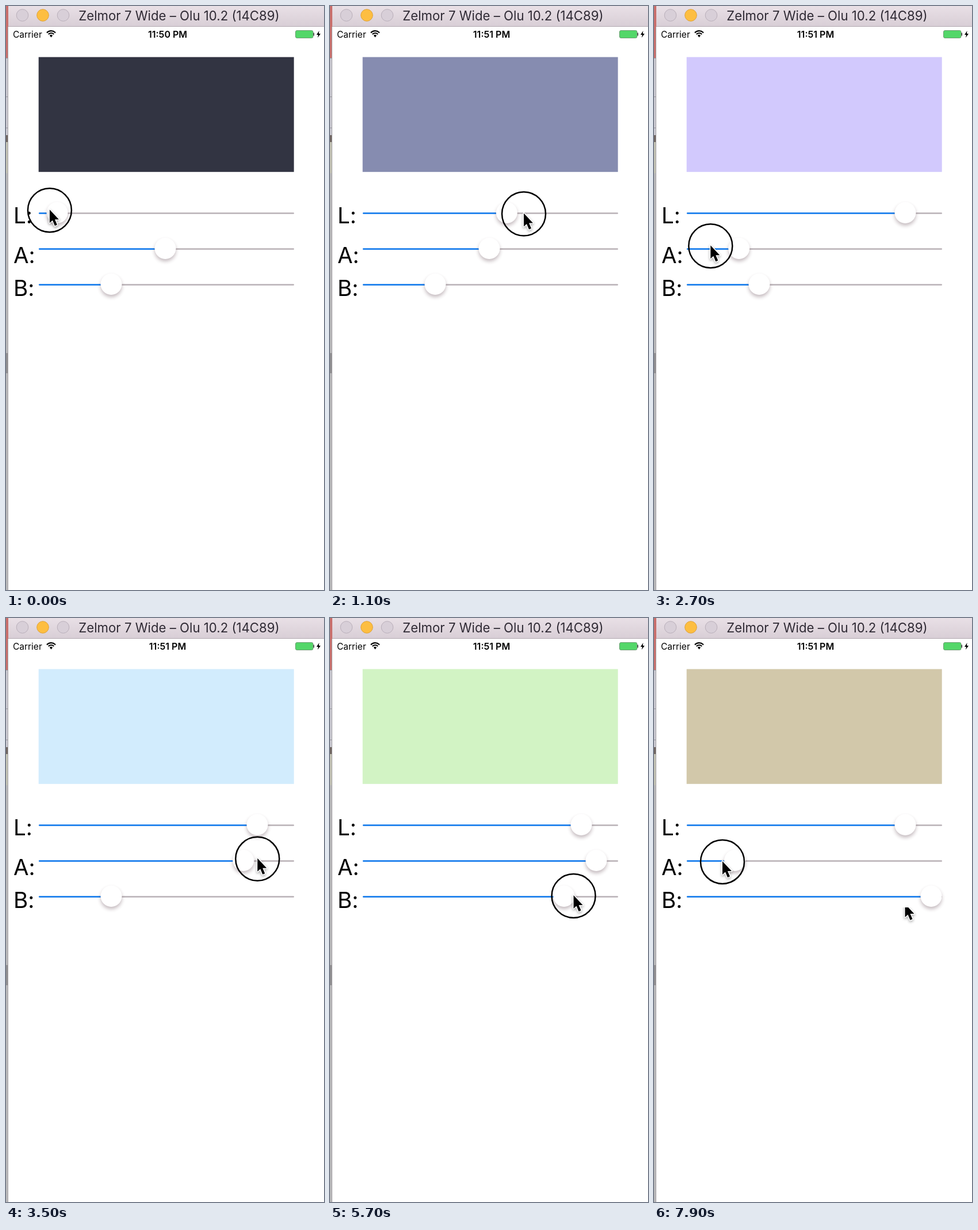
Animation of 553x1013 px, one loop 8000 ms. Source, as an HTML page with a canvas:

```html
<!DOCTYPE html>
<html lang="en">
<head>
<meta charset="utf-8">
<title>Colour sliders</title>
<style>
html, body { margin: 0; width: 100%; height: 100%; overflow: hidden; background: #fff; }
canvas { display: block; }
</style>
</head>
<body>
<canvas id="stage" width="553" height="1013"></canvas>
<script>
const ctx = document.getElementById('stage').getContext('2d');
const LOOP = 8000, STEP = 100, LAG = 60;
const FONT = 'Inter, Roboto, sans-serif';
const LEFT = 57, RIGHT = 501, RADIUS = 18.5;

// Turning points of the pointer: time, x, y
const turns = [
  [-520, 190, 356], [150, 60, 354], [780, 236, 352], [1420, 437, 369], [1700, 437, 369],
  [2100, 277, 420], [2340, 440, 420], [2760, 80, 416], [3650, 463, 418], [3900, 463, 418],
  [4200, 183, 478], [4350, 183, 478], [4840, 55, 481], [5810, 435, 482], [6400, 482, 484],
  [6700, 436, 497], [7000, 463, 422], [8150, 75, 423]
];

// Each slider follows the pointer during its drags
const sliders = [
  { name: 'L', y: 359.5, baseline: 377, drags: [[-520, 1700]] },
  { name: 'A', y: 421.5, baseline: 446, drags: [[2100, 3700], [7000, LOOP]] },
  { name: 'B', y: 483.5, baseline: 503, drags: [[4200, 6400]] }
];

const clamp = (v, lo, hi) => Math.min(hi, Math.max(lo, v));
const ease = u => (1 - Math.cos(Math.PI * u)) / 2;

function pointerAt(t) {
  const i = turns.findIndex(p => p[0] > t);
  const [t0, x0, y0] = turns[i - 1], [t1, x1, y1] = turns[i];
  const k = ease((t - t0) / (t1 - t0));
  return { x: x0 + (x1 - x0) * k, y: y0 + (y1 - y0) * k };
}

function knobAt({ drags }, t) {
  const late = t - LAG;
  const [from, to] = drags.findLast(d => d[0] <= late) || drags[0];
  return clamp(pointerAt(clamp(late, from, to)).x, LEFT + RADIUS, RIGHT - RADIUS);
}

function swatchColor(knobs) {
  const [l, a, b] = knobs.map(x => (x - LEFT - RADIUS) / (RIGHT - LEFT - 2 * RADIUS));
  const red = 236 * Math.max(0.212, l);
  const green = red * (0.916 + 0.253 * a);
  const blue = Math.min(253, red * (1.49 - 0.68 * b));
  return `rgb(${[red, green, blue].map(Math.round)})`;
}

function box(x, y, w, h, color) {
  ctx.fillStyle = color;
  ctx.fillRect(x, y, w, h);
}

function disc(x, y, r, fill, stroke, width = 1) {
  ctx.beginPath();
  ctx.arc(x, y, r, 0, Math.PI * 2);
  if (fill) { ctx.fillStyle = fill; ctx.fill(); }
  if (stroke) { ctx.strokeStyle = stroke; ctx.lineWidth = width; ctx.stroke(); }
}

function line(x0, x1, y, color) {
  ctx.beginPath();
  ctx.roundRect(x0, y - 1.3, x1 - x0, 2.6, 1.3);
  ctx.fillStyle = color;
  ctx.fill();
}

function poly(points, x, y) {
  ctx.beginPath();
  points.forEach(([px, py]) => ctx.lineTo(x + px, y + py));
  ctx.closePath();
}

function label(text, x, y, size, color = '#000', weight = 400, align = 'left') {
  ctx.font = `${weight} ${size}px ${FONT}`;
  ctx.textAlign = align;
  ctx.fillStyle = color;
  ctx.fillText(text, x, y);
  return x + ctx.measureText(text).width;
}

function desktopEdge() {
  box(0, 0, 4, 1013, '#b9b8ba');
  box(0, 0, 4, 90, '#c96f6c');
  box(0, 90, 4, 134, '#c9c8d0');
  for (const y of [90, 157, 211]) box(0, y, 4, 1, '#98969c');
  box(0, 224, 4, 12, '#6f6560');
  box(0, 236, 4, 54, '#c3c2b4');
  box(0, 602, 4, 35, '#8f8e90');
  box(3, 36, 1, 977, '#a9a7aa');
}

function titleBar() {
  const g = ctx.createLinearGradient(0, 0, 0, 35);
  g.addColorStop(0, '#e9e0e6');
  g.addColorStop(1, '#d8ced6');
  box(4, 0, 549, 35, g);
  box(4, 35, 549, 1, '#b3aab1');
  disc(28.5, 16, 10.3, '#d8cfd8', '#b9afba');
  disc(64, 16, 10.3, '#fdbe41', '#dfa238');
  disc(99.5, 16, 10.3, '#d8cfd8', '#b9afba');
  label('Zelmor 7 Wide – Olu 10.2 (14C89)', 301, 25, 22.2, '#2f2a34', 400, 'center');
}

function statusBar(t) {
  label('Carrier', 12, 55, 15.5);
  label(t < 400 ? '11:50 PM' : '11:51 PM', 281, 55, 16, '#000', 600, 'center');

  const wifi = r => ctx.arc(78.5, 53.5, r, -Math.PI * 0.76, -Math.PI * 0.24);
  ctx.strokeStyle = ctx.fillStyle = '#000';
  ctx.lineWidth = 2.2;
  for (const r of [6.5, 10.3]) {
    ctx.beginPath();
    wifi(r);
    ctx.stroke();
  }
  ctx.beginPath();
  ctx.moveTo(78.5, 54.5);
  wifi(3.6);
  ctx.fill();

  ctx.beginPath();
  ctx.roundRect(503.5, 42.5, 30.5, 13, 2.5);
  ctx.fillStyle = '#53d769';
  ctx.fill();
  ctx.strokeStyle = '#6c9c72';
  ctx.lineWidth = 1;
  ctx.stroke();
  box(534.5, 46.5, 1.5, 5, '#333');
  poly([[4.5, 0], [0, 7], [3, 7], [2, 12], [7, 5], [4, 5]], 540, 43);
  ctx.fillStyle = '#000';
  ctx.fill();
}

function drawSlider({ name, y, baseline }, x) {
  // The colon is set apart so that it stays on the baseline
  const end = label(name, 13, baseline, 38.5);
  label(':', end, baseline, 38.5);
  line(LEFT, RIGHT, y, '#b9b1b6');
  line(LEFT, x, y, '#0f7ef5');
  ctx.save();
  ctx.shadowColor = 'rgba(75, 45, 55, 0.32)';
  ctx.shadowBlur = 6;
  ctx.shadowOffsetY = 4;
  disc(x, y - 1, RADIUS, '#fff');
  ctx.restore();
}

function arrow(x, y) {
  poly([[0, -1], [0, 22], [5, 17.5], [9, 27], [13, 25.3], [9, 16], [16, 16]], x, y);
  ctx.save();
  ctx.shadowColor = 'rgba(0, 0, 0, 0.35)';
  ctx.shadowBlur = 4;
  ctx.shadowOffsetY = 2;
  ctx.strokeStyle = '#fff';
  ctx.lineWidth = 3;
  ctx.lineJoin = 'round';
  ctx.stroke();
  ctx.restore();
  ctx.fillStyle = '#000';
  ctx.fill();
}

// Part of the pointer that stays behind after the last slider
function leftover() {
  ctx.save();
  ctx.beginPath();
  ctx.rect(426, 502, 40, 30);
  ctx.clip();
  arrow(436.5, 497);
  ctx.restore();
}

function draw(t) {
  box(0, 0, 553, 1013, '#fff');
  desktopEdge();
  titleBar();
  statusBar(t);

  const knobs = sliders.map(s => knobAt(s, t));
  box(56.7, 88.6, 444, 199.2, swatchColor(knobs));
  sliders.forEach((s, i) => drawSlider(s, knobs[i]));
  if (t > 6700) leftover();

  const { x, y } = pointerAt(t);
  const pressed = sliders.some(s => s.drags.some(([from, to]) => t >= from && t < to));
  if (pressed) disc(x + 0.5, y, 38, null, '#000', 2.5);
  arrow(x + 0.5, y);
}

const start = performance.now();
function tick() {
  const t = (performance.now() - start) % LOOP;
  draw(Math.floor(t / STEP) * STEP);
  requestAnimationFrame(tick);
}
tick();
</script>
</body>
</html>
```
